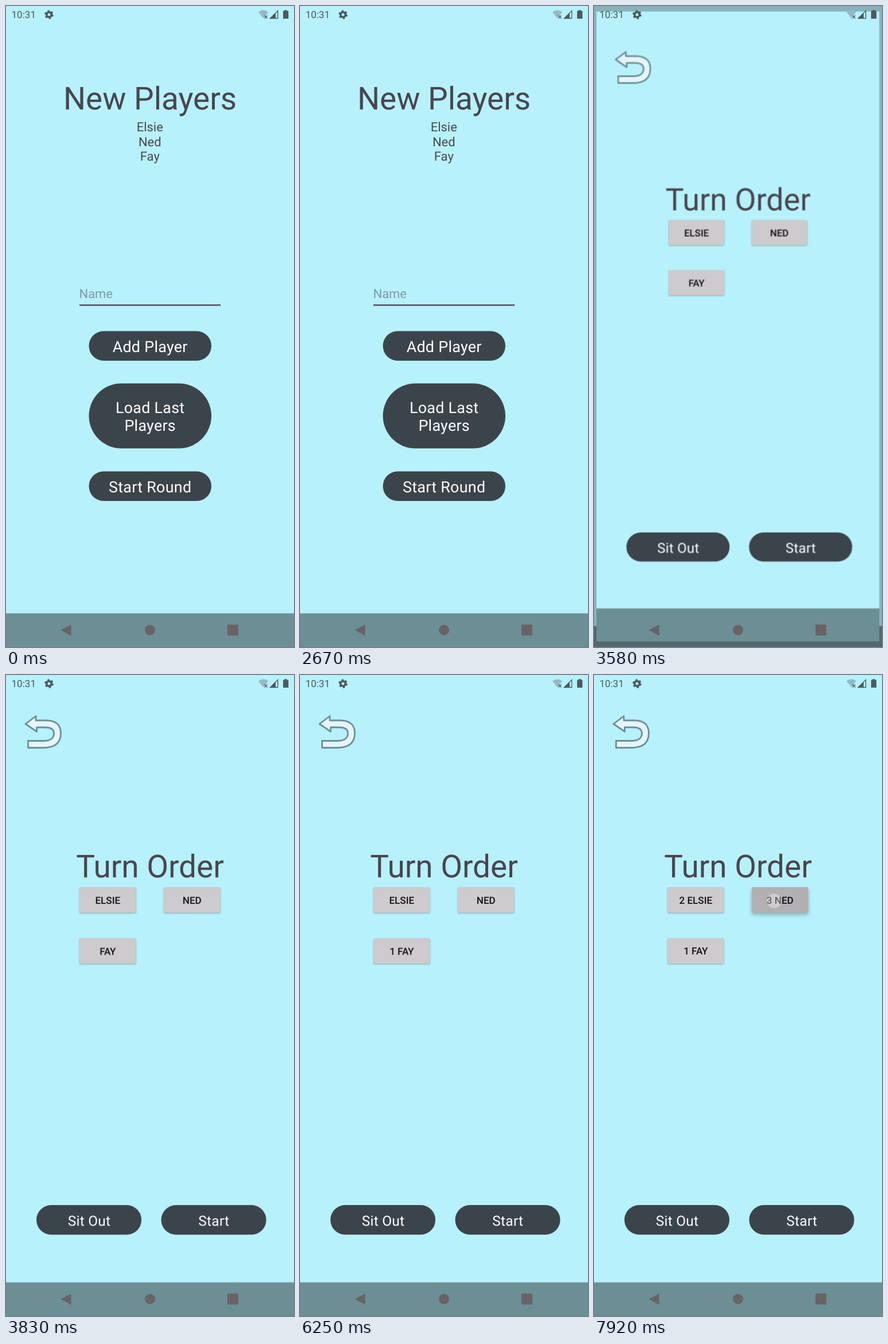
Recreate the animation shown at these times as an HTML page. Size 502 by 1115 pixels, loop 8000 ms.

```html
<!DOCTYPE html>
<html lang="en">
<head>
<meta charset="utf-8">
<title>Turn order</title>
<style>
  html, body { margin: 0; width: 100%; height: 100%; overflow: hidden; background: #b7f1fc; }
  body > svg { display: block; width: 502px; height: 1115px; font-family: Roboto, sans-serif; }
  text { text-anchor: middle; text-rendering: geometricPrecision; }
  .left { text-anchor: start; }
  .title { font-size: 54.9px; fill: #49454f; }
  .body { font-size: 21.96px; fill: #49484f; }
  .hint { fill: #7d9ca4; }
  .pill { fill: #3c444b; }
  .label { font-size: 26.84px; fill: #fff; letter-spacing: .3px; }
  .small { font-size: 24.4px; }
  .chip { fill: #cdcbcd; filter: drop-shadow(0 1px 1px rgba(0, 0, 0, .3)); }
  .name { font-size: 17.08px; font-weight: 500; fill: #141214; }

  /* One 8 s loop; 1% is 80 ms. */
  .screen { transform-origin: 251px 557.5px; }
  .old, .new, .dim, .caret { animation: 8s linear infinite; }
  .old { animation-name: grow; }
  .new { animation-name: enter, appear; }
  .dim { animation-name: dim; }
  .caret { animation-name: blink; animation-timing-function: step-end; }

  /* The window change eases along two joined curves. */
  @keyframes grow {
    0% { transform: scale(1); }
    43% { transform: scale(1); animation-timing-function: cubic-bezier(.3, 0, .8, .15); }
    43.83% { transform: scale(1.02); animation-timing-function: cubic-bezier(.05, .7, .1, 1); }
    48%, 100% { transform: scale(1.05); }
  }
  @keyframes enter {
    0% { transform: scale(.85); }
    43% { transform: scale(.85); animation-timing-function: cubic-bezier(.3, 0, .8, .15); }
    43.83% { transform: scale(.91); animation-timing-function: cubic-bezier(.05, .7, .1, 1); }
    48%, 100% { transform: scale(1); }
  }
  @keyframes appear { 0%, 43.55% { opacity: 0; } 44.6%, 100% { opacity: 1; } }
  @keyframes dim { 0%, 43% { opacity: 0; } 44.5%, 100% { opacity: .26; } }
  @keyframes blink {
    0% { opacity: 0; } 1% { opacity: 1; } 7.25% { opacity: 0; }
    13.5% { opacity: 1; } 19.75% { opacity: 0; }
    26% { opacity: 1; } 32.25%, 100% { opacity: 0; }
  }

  /* Taps share one timeline, shifted by --at. */
  .dot, .ripple, .before, .after, .lift { animation: 8s linear var(--at) infinite; }
  .dot, .before, .after { animation-timing-function: step-end; }
  .dot { fill: rgba(255, 255, 255, .36); stroke: rgba(110, 110, 110, .3); opacity: 0; animation-name: touch; }
  .ripple { transform-box: fill-box; transform-origin: center; opacity: 0; animation-name: spread, fade; }
  .quick { animation-name: spread, fade-quick; }
  .after { opacity: 0; animation-name: show; }
  .before { animation-name: hide; }
  .lift { animation-name: lift; }
  .held .dot { animation-name: touch-held; }
  .held .ripple { animation-name: spread, fade-held; }
  @keyframes touch { 0% { opacity: 1; } 5.15%, 100% { opacity: 0; } }
  @keyframes touch-held { 0% { opacity: 1; } 8%, 100% { opacity: 0; } }
  @keyframes spread {
    0% { transform: scale(.2); animation-timing-function: ease-out; }
    2%, 100% { transform: scale(1); }
  }
  @keyframes fade { 0%, 5.1% { opacity: .13; } 8.1%, 100% { opacity: 0; } }
  @keyframes fade-quick { 0%, 5.1% { opacity: .13; } 6%, 100% { opacity: 0; } }
  @keyframes fade-held { 0%, 8% { opacity: .13; } 11%, 100% { opacity: 0; } }
  @keyframes hide { 0% { opacity: 1; } 2% { opacity: 0; } 45%, 100% { opacity: 1; } }
  @keyframes show { 0% { opacity: 0; } 2% { opacity: 1; } 45%, 100% { opacity: 0; } }
  @keyframes lift {
    0%, 3.5% { filter: drop-shadow(0 1px 1px rgba(0, 0, 0, .3)); }
    5%, 12% { filter: drop-shadow(0 4px 3px rgba(0, 0, 0, .25)); }
    14%, 100% { filter: drop-shadow(0 1px 1px rgba(0, 0, 0, .3)); }
  }
</style>
</head>
<body>
<svg viewBox="0 0 502 1115">
  <defs>
    <g id="window">
      <rect width="502" height="1115" fill="#b7f1fc"/>
      <rect y="1056.5" width="502" height="58.5" fill="#6c8e95"/>
    </g>
    <rect id="chip" width="98.5" height="44.5" rx="2"/>
    <clipPath id="chip-clip"><use href="#chip"/></clipPath>
    <clipPath id="start-clip"><rect x="144.5" y="809.5" width="213.5" height="51.5" rx="25.7"/></clipPath>
  </defs>

  <g class="screen old">
    <use href="#window"/>
    <text class="title" x="251" y="180">New Players</text>
    <g class="body">
      <text x="250.8" y="218">Elsie</text>
      <text x="250.8" y="243.7">Ned</text>
      <text x="250.8" y="269.4">Fay</text>
      <text class="left hint" x="127.5" y="507.5">Name</text>
    </g>
    <rect x="128" y="519" width="246" height="2.6" fill="#5b5266"/>
    <rect class="caret" x="128" y="484" width="2.2" height="30" fill="#564d61"/>
    <g class="pill">
      <rect x="144.5" y="565.5" width="213.5" height="51.5" rx="25.7"/>
      <rect x="144.5" y="656.5" width="213.5" height="113" rx="56.5"/>
      <rect x="144.5" y="809.5" width="213.5" height="51.5" rx="25.7"/>
    </g>
    <g class="label">
      <text x="251.2" y="601.5">Add Player</text>
      <text x="251.2" y="707.5">Load Last</text>
      <text x="251.2" y="739">Players</text>
      <text x="251.2" y="845.5">Start Round</text>
    </g>
    <g style="--at:2.91s">
      <g clip-path="url(#start-clip)"><circle class="ripple quick" cx="251" cy="837" r="115" fill="#fff"/></g>
      <circle class="dot" cx="251" cy="837" r="13.5"/>
    </g>
  </g>

  <rect class="dim" width="502" height="1115"/>

  <g class="screen new">
    <use href="#window"/>
    <path d="M34 85 52 71.5V79H70C88 79 95.5 88 95.5 101 95.5 118 85 126.5 65 126.5H38.5V114.5H65C78 114.5 83.5 109 83.5 101.5 83.5 94 78 91 68 91H53.5V98.5Z"
      fill="#e4f6fb" stroke="#6f8f98" stroke-width="2.8" stroke-linejoin="round"/>
    <text class="title" x="251" y="351.5">Turn Order</text>

    <g transform="translate(128 369)" style="--at:6.41s">
      <use class="chip" href="#chip"/>
      <text class="name before" x="49.3" y="28.8">ELSIE</text>
      <text class="name after" x="49.3" y="28.8">2 ELSIE</text>
      <g clip-path="url(#chip-clip)"><circle class="ripple" cx="39" cy="23" r="68"/></g>
      <circle class="dot" cx="39" cy="23" r="13.5"/>
    </g>
    <g class="held" transform="translate(275 369)" style="--at:7.49s">
      <use class="chip lift" href="#chip"/>
      <text class="name before" x="49.3" y="28.8">NED</text>
      <text class="name after" x="49.3" y="28.8">3 NED</text>
      <g clip-path="url(#chip-clip)"><circle class="ripple" cx="39" cy="24" r="68"/></g>
      <circle class="dot" cx="39" cy="24" r="13.5"/>
    </g>
    <g transform="translate(128 457.7)" style="--at:4.91s">
      <use class="chip" href="#chip"/>
      <text class="name before" x="49.3" y="28.8">FAY</text>
      <text class="name after" x="49.3" y="28.8">1 FAY</text>
      <g clip-path="url(#chip-clip)"><circle class="ripple" cx="39" cy="22" r="68"/></g>
      <circle class="dot" cx="39" cy="22" r="13.5"/>
    </g>

    <g class="pill">
      <rect x="53" y="922" width="183" height="51.5" rx="25.7"/>
      <rect x="270.5" y="922" width="183" height="51.5" rx="25.7"/>
    </g>
    <text class="label small" x="145" y="957.5">Sit Out</text>
    <text class="label small" x="362.3" y="957.5">Start</text>
  </g>

  <!-- system bars -->
  <g fill="#4b5a60">
    <text class="left" x="9.5" y="21.3" font-size="17.08">10:31</text>
    <g fill="none" stroke="#4b5a60">
      <circle cx="75" cy="15" r="4.3" stroke-width="3.6"/>
      <circle cx="75" cy="15" r="6.5" stroke-width="2.6" stroke-dasharray="3.4"/>
    </g>
    <path d="M440 10.5Q448.5 4 457 10.5L448.5 21.5Z" fill="#93bac5"/>
    <path d="M450.5 16.5 455.5 21.5M455.5 16.5 450.5 21.5" stroke="#4b5a60" stroke-width="1.4"/>
    <path d="M460.5 21.5 473.7 8.3V21.5Z" fill="none" stroke="#4b5a60" stroke-width="1.3"/>
    <path d="M460.5 21.5 470 12V21.5Z"/>
    <path d="M485.5 8.5V7H489.5V8.5H492.3V22H483V8.5Z"/>
  </g>
  <g fill="#686365">
    <path d="M95.5 1085.5 113.5 1076V1095.5Z"/>
    <circle cx="251" cy="1085.5" r="9"/>
    <rect x="386" y="1076" width="19" height="19" rx="1"/>
  </g>
</svg>
</body>
</html>
```
